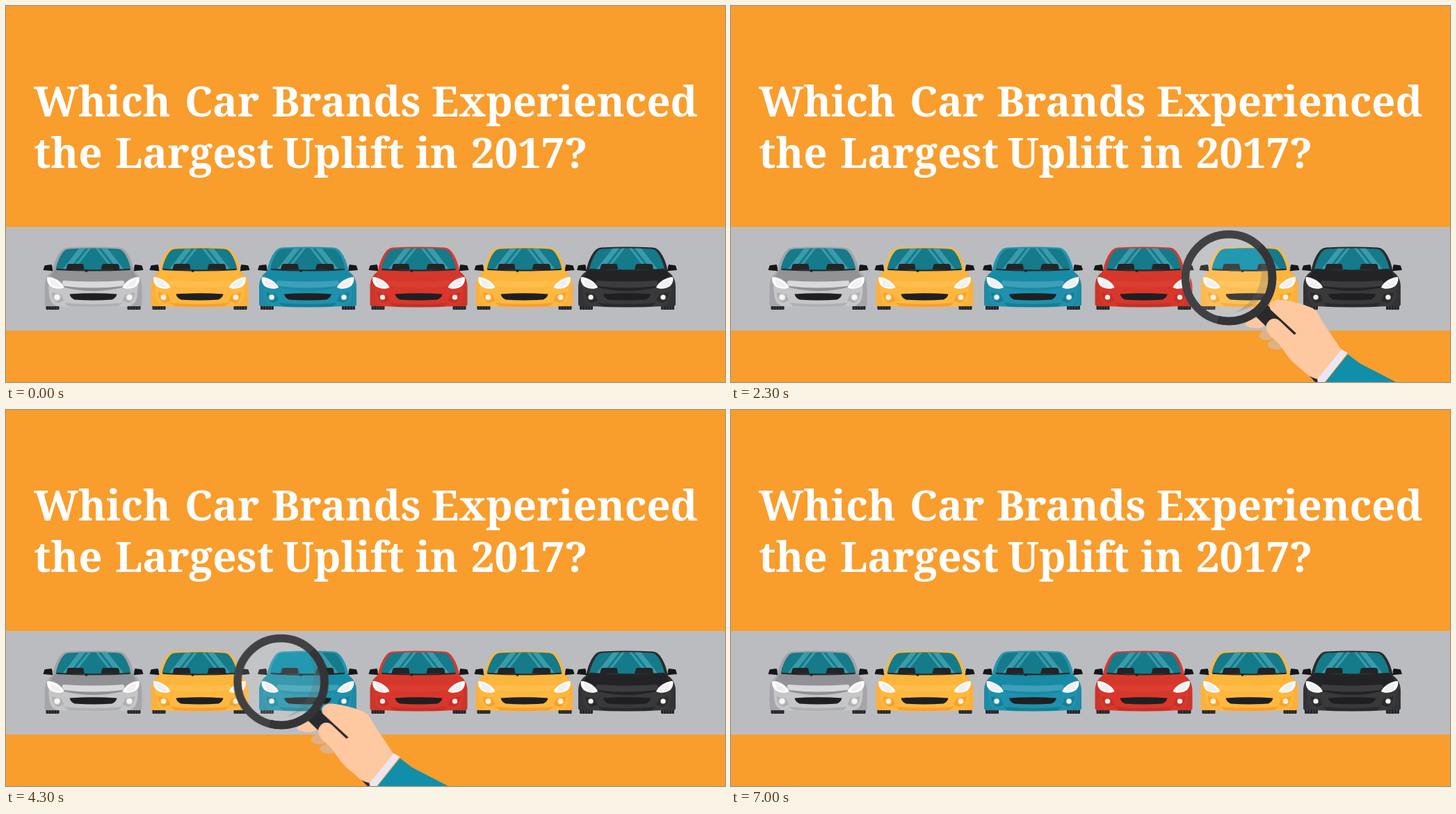
Recreate the animation shown at these times as an HTML page. Size 1034 by 541 pixels, loop 7.1 s.

```html
<!DOCTYPE html>
<html lang="en">
<head>
<meta charset="utf-8">
<title>Car brands uplift</title>
<style>
html, body { margin: 0; width: 100%; height: 100%; overflow: hidden; background: #f99d2d; }
svg { display: block; }
text { font: 700 60px "Noto Serif", serif; fill: #fff; }
.silver { --cabin: #a3a3a7; --side: #a6a6aa; --body: #c6c6c9; --hood: #929196; --band: #d9d9db; --low: #b0b0b3; }
.yellow { --cabin: #fdb640; --side: #fcb03c; --body: #ffb83f; --hood: #fdb53c; --band: #ffbd4b; --low: #f99f2e; }
.blue { --cabin: #2596b1; --side: #1f8aa4; --body: #1f91ad; --hood: #178aa5; --band: #3d9fb8; --low: #157d96; }
.red { --cabin: #d8392d; --side: #cb362b; --body: #d9372b; --hood: #d6372b; --band: #db3d31; --low: #c2312a; }
.black { --cabin: #2a2a2c; --side: #333335; --body: #39393b; --hood: #232325; --band: #3c3c3e; --low: #2a2a2c; }
</style>
</head>
<body>
<svg width="1034" height="541" viewBox="0 0 1034 541">
  <defs>
    <path id="screen" d="M-54 379C-52 368 -47 357 -41 351.500Q-39 349.800 -35 349.500Q0 347.500 35 349.500Q39 349.800 41 351.500C47 357 52 368 54 379Q0 383 -54 379Z"/>
    <clipPath id="screenClip"><use href="#screen"/></clipPath>
    <clipPath id="glassClip"><circle cy="391" r="58"/></clipPath>

    <g id="wipers" fill="#242426">
      <path d="M-39 379L-37 372Q-36 371 -34 371H-16Q-14 371 -14 373L-13 379ZM11 379L13 372Q14 371 16 371H34Q36 371 37 373L38 379Z"/>
      <path d="M-53 378Q0 381 53 378V380Q0 383 -53 380Z"/>
      <circle cx="-10" cy="381" r="2"/>
    </g>

    <g id="glare" fill="#3a9bab">
      <path d="M-19 347H-10L-36 380H-45ZM-6 347H-2L-28 380H-32Z"/>
    </g>

    <g id="backHalf">
      <rect x="-68" y="424" width="19" height="13" rx="1.500" fill="#252527"/>
      <path d="M-64.500 431V437M-60.500 431V437M-56.500 431V437M-52.500 431V437" stroke="#5c5c5f" stroke-width=".7"/>
      <path d="M-72 380L-70 373.500Q-69.500 373 -68 373L-60 372Q-58 377 -59 379L-52 380.500V383L-61 381Z" fill="#161618"/>
    </g>

    <g id="frontHalf">
      <path d="M-66 390C-57 390 -45 397 -42 405C-47 408 -57 407 -62 403C-66 399 -67 394 -66 390Z" fill="#fff"/>
      <path d="M-62 393C-56 394 -49 399 -46 404C-52 406 -58 404 -60 401C-62 398 -62 395 -62 393Z" fill="#f0eff2"/>
      <path d="M-60 412L-46 415L-42 424L-50 427Q-58 426 -60 412Z" fill="var(--low)"/>
      <circle cx="-52" cy="419" r="4.800" fill="var(--band)"/>
      <circle cx="-52" cy="419" r="3.600" fill="#fbf7ee"/>
    </g>

    <g id="car">
      <use href="#backHalf"/>
      <use href="#backHalf" transform="scale(-1 1)"/>
      <path d="M-59 384C-57 369 -51 356 -44 350Q-41 347.800 -37 347.500Q0 345.500 37 347.500Q41 347.800 44 350C51 356 57 369 59 384Z" fill="var(--cabin)"/>
      <path d="M-57 381C-66 386 -70 394 -70 404V429Q-70 432 -66 432H66Q70 432 70 429V404C70 394 66 386 57 381Z" fill="var(--side)"/>
      <path d="M-56 382H56C62 388 64 396 64 404C64 424 60 430 50 432Q0 435 -50 432C-60 430 -64 424 -64 404C-64 396 -62 388 -56 382Z" fill="var(--body)"/>
      <path d="M-56 380Q0 383 56 380L62 390C53 391 45 397 42 405Q0 415 -42 405C-45 397 -53 391 -62 390Z" fill="var(--hood)"/>
      <path d="M-43 395Q0 398 43 395Q47 398 42 403Q0 408 -42 403Q-47 398 -43 395Z" fill="var(--band)"/>
      <path d="M-42 427Q0 431 42 427L36 432Q0 434 -36 432Z" fill="var(--low)"/>
      <path d="M-34 414.500Q0 412 34 414.500Q33 420 27 422.500Q0 424.500 -27 422.500Q-33 420 -34 414.500Z" fill="#1f1f21"/>
      <use href="#screen" fill="#157a8a"/>
      <g clip-path="url(#screenClip)">
        <use href="#glare"/>
        <use href="#glare" transform="scale(-1 1)"/>
      </g>
      <use href="#wipers"/>
      <use href="#frontHalf"/>
      <use href="#frontHalf" transform="scale(-1 1)"/>
    </g>

    <g id="clearScreen">
      <use href="#screen" fill="#0089a8"/>
      <use href="#wipers"/>
    </g>
  </defs>

  <rect width="1034" height="541" fill="#f99d2d"/>
  <rect y="318" width="1034" height="149" fill="#bbbcc0"/>

  <text y="159"><tspan x="40">Which</tspan> <tspan x="257">Car</tspan> <tspan x="382">Brands</tspan> <tspan x="612">Experienced</tspan></text>
  <text y="233"><tspan x="40">the</tspan> <tspan x="157">Largest</tspan> <tspan x="398">Uplift</tspan> <tspan x="589">in</tspan> <tspan x="669">2017?</tspan></text>

  <g id="cars"></g>

  <g id="lens">
    <g clip-path="url(#glassClip)">
      <g id="view"></g>
      <circle cy="391" r="58" fill="#f4f7e6" fill-opacity=".14"/>
      <path d="M36 343C58 378 46 424 8 441C48 434 70 398 52 358Z" fill="#5c6a6c" fill-opacity=".25"/>
    </g>
    <g transform="translate(0 391)">
      <path d="M23 68C27 60 36 57 43 58L54 68C46 74 32 74 23 68Z" fill="#fdc8a1"/>
      <path d="M43 85C44 79 52 73 58 75L68 85C62 91 49 92 43 85Z" fill="#dfb285"/>
      <path d="M55 97C57 92 63 89 68 89L78 101C70 105 60 104 55 97Z" fill="#dfb285"/>
      <path d="M37 54L55 39L98 79L95 83L84 100Z" fill="#2a2a2c"/>
      <path d="M110 135L132 142L127 150H124Z" fill="#2a2a2c"/>
      <path d="M60 46C56 37 63 31 74 31.500C90 33 106 38 119 43C126 46 130 55 134 62L162 104L130 146C120 145 112 140 106 133C94 124 88 118 82 109L72 95L62 86C53 77 51 70 56 64C61 57 68 58 73 62L94 82L97 80Z" fill="#fec8a1"/>
      <path d="M162 103L171 108L138 150H128L127 146Z" fill="#ebe6f1"/>
      <path d="M171 110L188 123L242 151H138Z" fill="#108eaa"/>
      <circle r="62.500" fill="none" stroke="#414143" stroke-width="11.500"/>
      <path d="M44.200 -44.200A62.500 62.500 0 0 1 -16 60.400" fill="none" stroke="#343436" stroke-width="11.500"/>
      <path id="arrow" d="M0 -49L18 -19H8V36H-8V-19H-18Z" fill="#8cc43f" stroke="#eef5df" stroke-width="1.200"/>
    </g>
  </g>
</svg>
<script>
const $ = id => document.getElementById(id);
const LOOP = 7100, TICK = 100;
const cars = [[125.5, 'silver'], [278.5, 'yellow'], [434, 'blue'], [593.5, 'red'], [745.5, 'yellow'], [893, 'black']];
const place = (id, x, look = '') => `<use href="#${id}" x="${x}" class="${look}"/>`;
$('cars').innerHTML = cars.map(([x, look]) => place('car', x, look)).join('');
$('view').innerHTML = cars.map(([x]) => place('clearScreen', x)).join('');

// Lens centre at each stop, and after the first tick of leaving it
const stops = [893, 742, 598, 431, 277, 126];
const leaves = [857, 716, 549, 395.5, 243.5];

const steps = [];
const put = (time, x, arrow = 0) => steps.push({ time, x, arrow });
const slide = (time, from, to, count) => {
  for (let k = 0; k < count; k++) put(time + k * TICK, from + (to - from) * k / (count - 1));
};

put(0, 1300);
slide(100, 1072, stops[0], 7);
stops.forEach((x, i) => {
  const start = 800 + 1000 * i;
  put(start, x, 1);
  if (i < leaves.length) slide(start + 500, leaves[i], stops[i + 1], 5);
  else slide(start + 500, 80, -244, 8);
});
put(LOOP, -400);

function play(id, style) {
  const frames = steps.map(s => ({ offset: s.time / LOOP, easing: 'step-end', ...style(s) }));
  $(id).animate(frames, { duration: LOOP, iterations: Infinity });
}
play('lens', s => ({ transform: `translate(${s.x}px, 0px)` }));
play('view', s => ({ transform: `translate(${-s.x}px, 0px)` }));
play('arrow', s => ({ opacity: s.arrow }));
</script>
</body>
</html>
```
